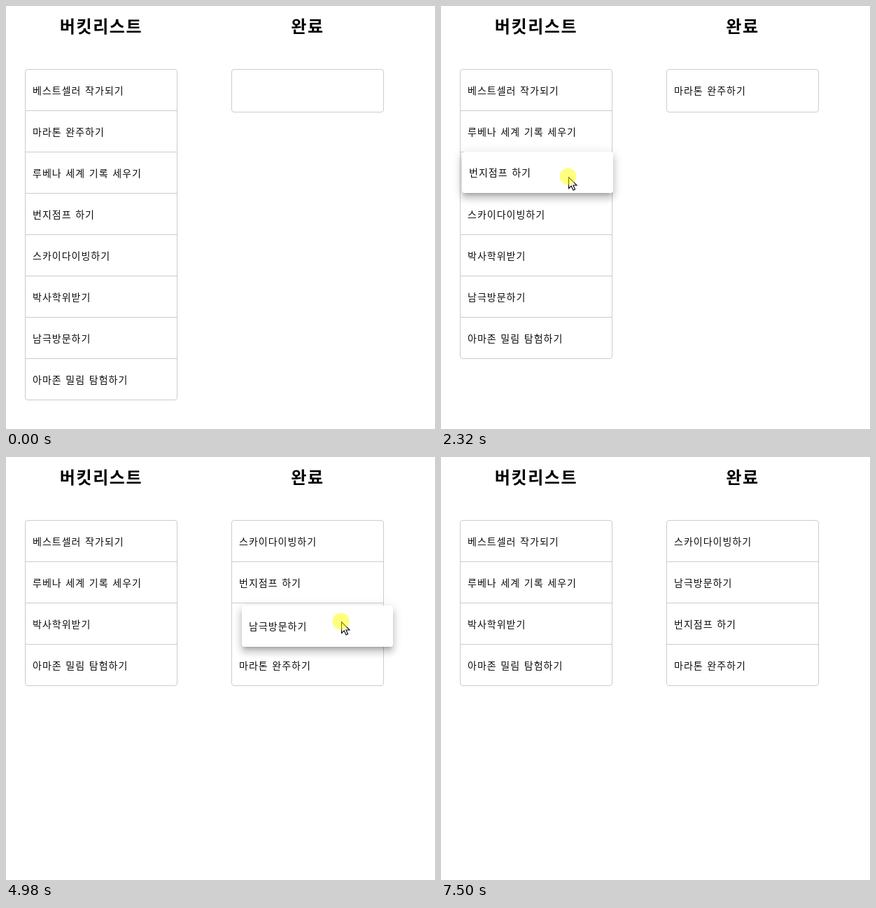
An HTML page that plays this animation: 613x604 px, repeating every 7880 ms.

```html
<!DOCTYPE html>
<html lang="ko">
<head>
<meta charset="utf-8">
<style>
  html, body { margin: 0; width: 100%; height: 100%; overflow: hidden; background: #fff; }
  body { position: relative; font-family: "Noto Sans CJK KR", "Noto Sans CJK", sans-serif; }
  h2, .list, .item, svg { position: absolute; margin: 0; box-sizing: border-box; }
  h2 { top: 9px; width: 218px; text-align: center; font-size: 24px; line-height: 38px; letter-spacing: 1.6px; }
  .list { top: 90px; width: 218px; border: 1px solid #ccc; border-radius: 4px; }
  .item {
    left: 0; top: 0; width: 216px; height: 59px; padding-left: 10px;
    border-bottom: 1px solid #ccc;
    font-size: 14px; font-weight: 300; line-height: 58px;
    letter-spacing: 1px; word-spacing: .8px; white-space: nowrap;
    color: rgba(0, 0, 0, .95);
  }
  .last { border-color: transparent; }
  .float {
    z-index: 1; background: #fff; border-color: #fff; border-radius: 4px;
    box-shadow: 0 5px 5px -3px rgba(0, 0, 0, .2), 0 8px 10px 1px rgba(0, 0, 0, .14),
      0 3px 14px 2px rgba(0, 0, 0, .12);
  }
  svg { left: 0; top: 0; z-index: 2; overflow: visible; }
  path { fill: #fff; stroke: #000; stroke-width: 1.1; }
  circle { fill: rgba(255, 255, 0, .5); }
</style>
</head>
<body>
<h2 style="left:27px">버킷리스트</h2>
<h2 style="left:322px">완료</h2>
<div class="list" style="left:27px"></div>
<div class="list" style="left:322px"></div>
<svg id="pointer" width="1" height="1">
  <path id="arrow" d="M.5 .5V16.5L4.2 13L7 19L9.6 17.8L6.9 12H12Z"/>
  <path id="move" d="M0-11.5L5-6.5H1.8V-1.8H6.5V-5L11.5 0L6.5 5V1.8H1.8V6.5H5L0 11.5L-5 6.5H-1.8V1.8H-6.5V5L-11.5 0L-6.5-5V-1.8H-1.8V-6.5H-5Z"/>
  <circle id="press" cx="-.5" cy="-.5" r="12"/>
</svg>
<script>
const LOOP = 7880, SHOW = 200, EXIT = 7090, HIDE = 7490;
const PRESS = 90, TRAVEL = 400, CARRY = 500, REST = 60, SETTLE = 250, BOW = 75;
const ROW = 59, TOP = 91, WIDTH = 216, COLUMN_X = [28, 323];
const names = ['베스트셀러 작가되기', '마라톤 완주하기', '루베나 세계 기록 세우기', '번지점프 하기',
  '스카이다이빙하기', '박사학위받기', '남극방문하기', '아마존 밀림 탐험하기'];

const at = (x, y) => ({ x, y });
const drags = [
  { id: 1, to: 0, lift: 930, drop: 1700, grab: at(125, 181), release: at(420, 121) },
  { id: 3, to: 0, lift: 2300, drop: 2960, grab: at(180, 245), release: at(475, 131) },
  { id: 4, to: 0, lift: 3490, drop: 3990, grab: at(138, 265), release: at(428, 151) },
  { id: 6, to: 2, lift: 4490, drop: 5060, grab: at(170, 291), release: at(479, 235) },
  { id: 3, to: 2, lift: 5980, drop: 6490, grab: at(463, 172), release: at(460, 254) }
];

const $ = id => document.getElementById(id);
const lists = [...document.querySelectorAll('.list')];
const items = names.map(name => {
  const el = document.createElement('div');
  el.textContent = name;
  return document.body.appendChild(el);
});

const clamp = p => Math.min(1, Math.max(0, p));
const smooth = p => p * p * (3 - 2 * p);
const easeOut = p => 1 - (1 - clamp(p)) ** 3;
const mix = (a, b, p) => at(a.x + (b.x - a.x) * p, a.y + (b.y - a.y) * p);
const place = (el, { x, y }) => { el.style.transform = `translate(${Math.round(x)}px, ${Math.round(y)}px)`; };

// The pointer carries items straight and swings back in an arc.
const legs = [];
let here = at(454, 494), free = SHOW;
function go(start, end, to, bow = 0) {
  legs.push({ start, end, from: here, to, bow });
  here = to;
  free = end;
}
go(SHOW, SHOW + 140, at(322, 230));
for (const d of drags) {
  d.press = d.lift - PRESS;
  d.enter = d.lift + CARRY * .65;
  go(Math.max(free, d.press - TRAVEL), d.press, d.grab, BOW);
  go(d.lift, d.lift + CARRY, d.release);
  free = d.drop + REST;
}
go(EXIT, HIDE, at(556, 610));

function pointerAt(t) {
  const { start, end, from, to, bow } = legs.findLast(leg => t >= leg.start) || legs[0];
  const s = smooth(clamp((t - start) / (end - start)));
  const p = mix(from, to, s), dx = to.x - from.x, dy = to.y - from.y;
  const k = bow * Math.sin(Math.PI * s) / Math.hypot(dx, dy);
  return at(p.x - dy * k, p.y + dx * k);
}

function columnsAt(t) {
  let columns = [names.map((_, i) => i), []];
  for (const d of drags.filter(d => t >= d.enter)) {
    columns = columns.map(c => c.filter(id => id !== d.id));
    columns[1].splice(d.to, 0, d.id);
  }
  return columns;
}

function slotOf(id, columns) {
  const c = columns[0].includes(id) ? 0 : 1;
  const row = columns[c].indexOf(id);
  return { x: COLUMN_X[c], y: TOP + row * ROW, last: row === columns[c].length - 1 };
}

function floatAt(d, t, slot) {
  const home = slotOf(d.id, columnsAt(d.press)), p = pointerAt(Math.min(t, d.drop));
  const held = at(home.x + p.x - d.grab.x, home.y + p.y - d.grab.y);
  return mix(held, slot, easeOut((t - d.drop) / SETTLE));
}

function drawPointer(t, columns) {
  const show = (id, on) => { $(id).style.display = on ? '' : 'none'; };
  const p = pointerAt(t);
  const dragging = drags.some(d => t >= d.lift && t < d.drop);
  const overItem = columns.some((c, i) => p.x >= COLUMN_X[i] && p.x < COLUMN_X[i] + WIDTH &&
    p.y >= TOP && p.y < TOP + c.length * ROW);
  show('pointer', t >= SHOW && t < HIDE);
  show('move', overItem && !dragging);
  show('arrow', !overItem || dragging);
  show('press', drags.some(d => t >= d.press && t < d.drop));
  place($('pointer'), p);
}

function draw(t) {
  const columns = columnsAt(t);
  lists.forEach((el, i) => { el.style.height = Math.max(62, columns[i].length * ROW + 1) + 'px'; });
  // Neighbours slide only when an item is sorted within its own list.
  const moved = drags.findLast(d => t >= d.enter);
  const before = moved && columnsAt(moved.enter - 1);
  const sorted = before && before[1].includes(moved.id);
  items.forEach((el, id) => {
    const slot = slotOf(id, columns);
    const drag = drags.find(d => d.id === id && t >= d.lift && t < d.drop + SETTLE);
    let pos = slot;
    if (drag) pos = floatAt(drag, t, slot);
    else if (sorted) pos = mix(slotOf(id, before), slot, easeOut((t - moved.enter) / SETTLE));
    el.className = 'item' + (drag ? ' float' : slot.last ? ' last' : '');
    place(el, pos);
  });
  drawPointer(t, columns);
}

const begin = performance.now();
(function tick() {
  draw((performance.now() - begin) % LOOP);
  requestAnimationFrame(tick);
})();
</script>
</body>
</html>
```
